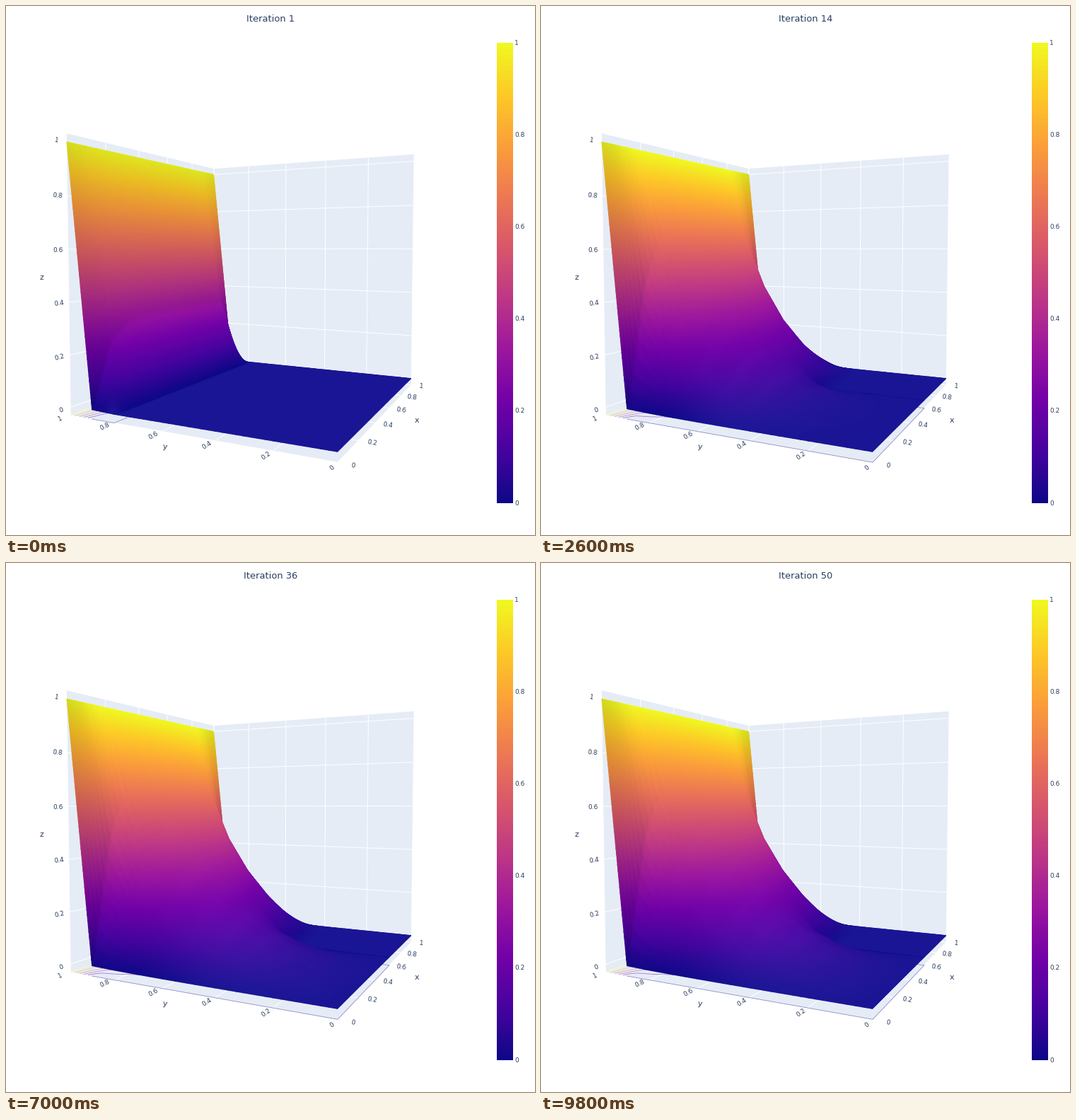
A matplotlib script that plays this animation: 748x748 px, repeating every 10000 ms.

```python
import numpy as np
import matplotlib.pyplot as plt
from matplotlib.animation import FuncAnimation
from matplotlib.collections import LineCollection, QuadMesh
from matplotlib.colors import LinearSegmentedColormap
from matplotlib.patches import Polygon

SIZE, FRAMES, STEP_MS = 748, 50, 200
INK, WALL = "#2a3f5f", "#e5ecf6"
PAD = 1 / 32                      # extra room below and above the z data
LOW, HIGH = -PAD, 1 + PAD
TICKS = np.linspace(0, 1, 6)
cmap = LinearSegmentedColormap.from_list("heat", [
    "#0d0887", "#46039f", "#7201a8", "#9c179e", "#bd3786",
    "#d8576b", "#ed7953", "#fb9f3a", "#fdca26", "#f0f921"], N=1024)

# ---- camera -------------------------------------------------------------
EYE = np.array([-2.0, -1.0, 0.1])
DIST = np.linalg.norm(EYE)
AHEAD = -EYE / DIST
RIGHT = np.cross(AHEAD, [0, 0, 1])
RIGHT /= np.linalg.norm(RIGHT)
UP = np.cross(RIGHT, AHEAD)
FOCAL, CX, CY = 804, 356, 377.6


def project(x, y, z):
    """Data coordinates to stage pixels, shape (..., 2)."""
    p = np.stack(np.broadcast_arrays(
        np.asarray(x) - 0.5, np.asarray(y) - 0.5,
        (np.asarray(z) - LOW) / (HIGH - LOW) - 0.5), axis=-1)
    depth = DIST + p @ AHEAD
    return np.stack([CX + FOCAL * (p @ RIGHT) / depth,
                     CY - FOCAL * (p @ UP) / depth], axis=-1)


# ---- heat on a plate with one corner cut out ----------------------------
N = 11
NODES = np.linspace(0, 1, N)


def relax(u):
    """One Gauss-Seidel sweep; u is indexed [x, y]."""
    u = u.copy()
    for i in range(1, N - 1):
        for j in range(1, N - 1):
            if i < 6 or j > 4:
                u[i, j] = (u[i - 1, j] + u[i + 1, j]
                           + u[i, j - 1] + u[i, j + 1]) / 4
    return u


def refine(counts):
    parts = [np.linspace(a, b, n, endpoint=False)
             for a, b, n in zip(NODES[:-1], NODES[1:], counts)]
    return np.append(np.concatenate(parts), 1.0)


def weights(fine):
    return np.clip(1 - np.abs(fine[:, None] - NODES) * (N - 1), 0, 1)


# the renderer grows shaded triangles by half a pixel, so the rim is inset
INSET = 0.0014
XS = np.clip(refine([7] + [4] * 8 + [9]), INSET, 1 - INSET)
YS = np.maximum(refine([4] * 7 + [6, 14, 48]), INSET)
WX, WY = weights(XS), weights(YS)

plates = []
plate = np.zeros((N, N))
plate[:, -1] = 1
for _ in range(FRAMES):
    plate = relax(plate)
    plates.append(plate)

GLOSS_AXIS = np.array([-0.224, -0.112, 1])
GLOSS_AXIS /= np.linalg.norm(GLOSS_AXIS)


def shade(z):
    """Lit colours: light from above, gloss leaning towards the eye."""
    normal = np.stack([-np.gradient(z, XS, axis=0) / (HIGH - LOW),
                       -np.gradient(z, YS, axis=1) / (HIGH - LOW),
                       np.ones_like(z)], axis=-1)
    normal /= np.linalg.norm(normal, axis=-1, keepdims=True)
    light = np.minimum(0.8 + 0.8 * normal[..., 2:], 1)
    facing = np.maximum(normal @ GLOSS_AXIS, 0.05) ** 2
    gloss = 0.059 * np.exp(-2.5 * (1 - facing) / facing)
    rgba = cmap(z)
    rgba[..., :3] = np.clip(rgba[..., :3] * light + gloss[..., None], 0, 1)
    return rgba


# ---- stage --------------------------------------------------------------
fig = plt.figure(figsize=(SIZE / 100, SIZE / 100), dpi=100, facecolor="white")
ax = fig.add_axes([0, 0, 1, 1])
ax.axis("off")


def px(n):
    return n * 0.72


def label(x, y, s, size=9, turn=0, ha="center"):
    return ax.text(x, y, s, fontsize=px(size), rotation=turn, color=INK,
                   ha=ha, va="center", family="DejaVu Sans")


def panel(*corners):
    ax.add_patch(Polygon([project(*c) for c in corners], closed=True,
                         fc=WALL, ec="none", zorder=1))


panel((0, 1, HIGH), (1, 1, HIGH), (1, 1, LOW), (0, 1, LOW))
panel((1, 1, HIGH), (1, 0, HIGH), (1, 0, LOW), (1, 1, LOW))
panel((0, 1, LOW), (0, 0, LOW), (1, 0, LOW), (1, 1, LOW))

grid = []
for t in TICKS:
    for a, b in [((0, 1, t), (1, 1, t)), ((1, 1, t), (1, 0, t)),
                 ((t, 1, LOW), (t, 1, HIGH)), ((1, t, LOW), (1, t, HIGH)),
                 ((t, 0, LOW), (t, 1, LOW)), ((0, t, LOW), (1, t, LOW))]:
        grid.append([project(*a), project(*b)])
ax.add_collection(LineCollection(grid, colors="white", linewidths=px(1),
                                 zorder=2))

names = ["0", "0.2", "0.4", "0.6", "0.8", "1"]
z_at = [(78, 572, 20), (76, 497, 14), (75, 421, 8),
        (74, 345, 0), (73, 268, -6), (71, 190, -12)]
y_at = [(461, 653, 38), (368, 636, 35), (284, 621, 32),
        (208, 607, 29), (140, 595, 26), (77, 584, 24)]
x_at = [(491, 650, -10), (518, 618, -9), (540, 593, -8),
        (559, 572, -8), (574, 553, -7), (587.5, 538, -7)]
for spots in (z_at, y_at, x_at):
    for name, (x, y, turn) in zip(names, spots):
        label(x, y, name, turn=turn)
label(50, 384, "z", 11)
label(225, 624, "y", 11, turn=-8)
label(581, 586, "x", 11)
title = label(374, 18, "", 13)

ax.imshow(np.linspace(1, 0, 651)[:, None], cmap=cmap, vmin=0, vmax=1,
          extent=(694, 717, 703, 52), aspect="auto", interpolation="nearest")
ax.set_xlim(0, SIZE)
ax.set_ylim(SIZE, 0)
for name, t in zip(names, TICKS):
    label(719, 703 - 651 * t, name, ha="left")

floor_lines = LineCollection([], linewidths=px(0.8), alpha=0.5, zorder=3)
rim_line, = ax.plot([], [], color=cmap(0.0), lw=px(0.8), alpha=0.7, zorder=5)
ax.add_collection(floor_lines)
surface = []


def warm_edge(n):
    """Outline of the part of the plate that heat has reached."""
    y = max(0, 0.9 - 0.1 * n)
    path = [(0, 0.9), (0, y)]
    if y > 0.39:
        path += [(1, y)]
    else:
        path += [(0.6, y), (0.6, 0.4), (1, 0.4)]
    return np.array(path)


def draw(k):
    n = k + 1
    title.set_text(f"Iteration {n}")
    z = WX @ plates[k] @ WY.T

    # far cells come first, so near ones cover them
    spots = project(XS[:, None], YS[None, :], z)[::-1, ::-1]
    mesh = QuadMesh(spots, shading="gouraud", antialiased=True)
    mesh.set_facecolor(shade(z)[::-1, ::-1].reshape(-1, 4))
    mesh.set_transform(ax.transData)
    mesh.set_zorder(4)
    while surface:
        surface.pop().remove()
    ax.add_collection(mesh, autolim=False)
    surface.append(mesh)

    edge = warm_edge(n)
    lines = [project(edge[:, 0], edge[:, 1], LOW)]
    for level in TICKS[1:]:
        ys = [np.interp(level, col, YS) for col in z]
        lines.append(project(XS, ys, LOW))
    floor_lines.set_segments(lines)
    floor_lines.set_color(cmap(TICKS))

    # the zero contour on the surface shows only past the outer rim
    rim = edge[1:3]
    if len(edge) > 3:
        rim = np.array([edge[2], [0.6, max(edge[2, 1], 0.25)]])
    rim_line.set_data(*project(rim[:, 0], rim[:, 1], 0).T)
    return [title, mesh, floor_lines, rim_line]


anim = FuncAnimation(fig, draw, frames=FRAMES, interval=STEP_MS,
                     repeat=True, repeat_delay=0, blit=False)
plt.show()
```
